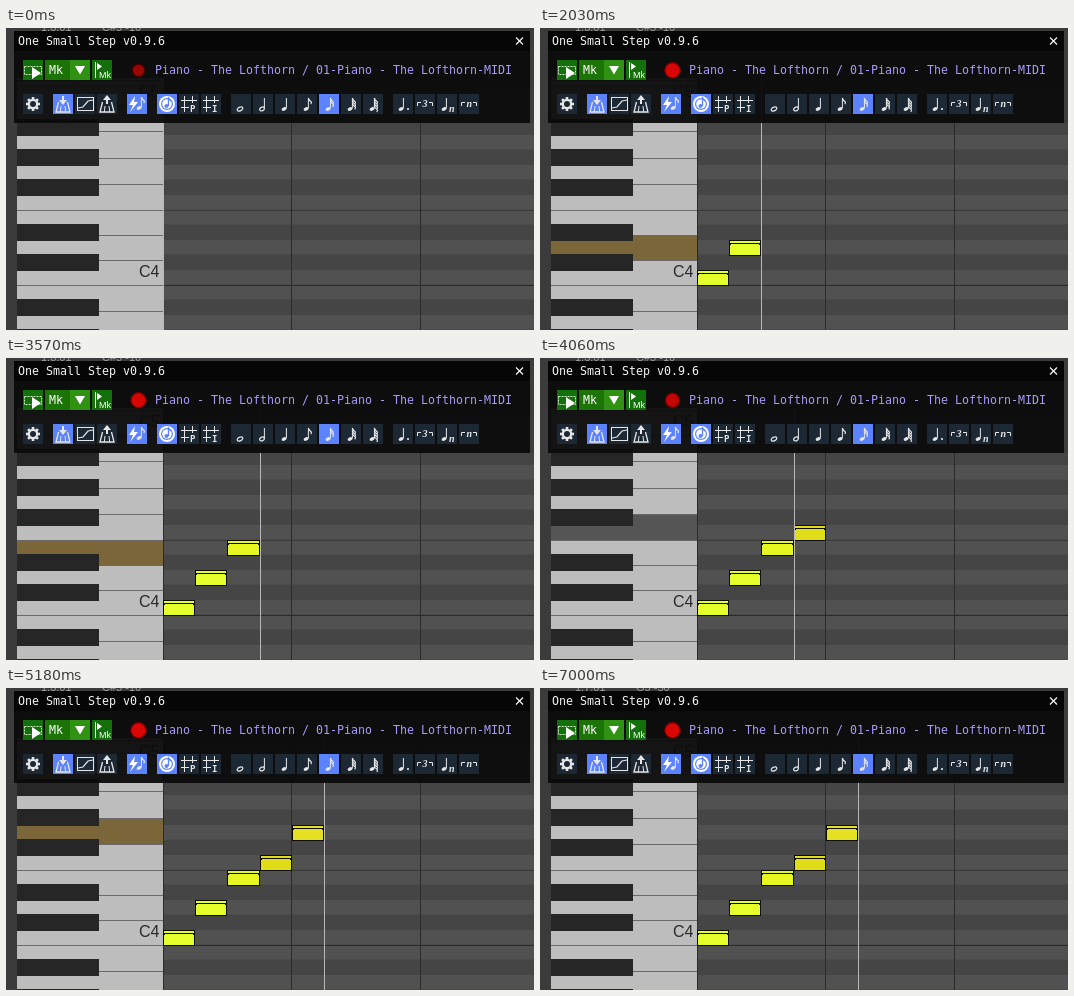
Recreate the animation shown at these times as an HTML page with a canvas. Size 528x302 px, loop 7070 ms.

```html
<!DOCTYPE html>
<html lang="en">
<head>
<meta charset="utf-8">
<title>Step input</title>
<style>
html, body { margin: 0; width: 528px; height: 302px; overflow: hidden; background: #3b3b3b; }
canvas { display: block; }
</style>
</head>
<body>
<canvas id="stage" width="528" height="302"></canvas>
<script>
const ctx = document.getElementById('stage').getContext('2d');
const W = 528, H = 302, LOOP = 7070, STEP = 70;
const MONO = '"DejaVu Sans Mono", monospace';
const SANS = '"Liberation Sans", Arial, sans-serif';
const SERIF = '"Liberation Serif", serif';
const ROW = 15, C4 = 242, ROLL_X = 157, BEAT = 128.8, ROLL_TOP = 50;
const BLACK = [1, 3, 6, 8, 10];
const WHITE = '#e6e6e6', BLUE = '#5b82ff', DARK = '#1c2834';

// semitone above C4, its white key, press and release times, colour
const NOTES = [
  { semi: 0, white: 0, on: 1050, off: 1540, fill: '#e4ff2c' },
  { semi: 2, white: 1, on: 1750, off: 2380, fill: '#e4ff2c' },
  { semi: 4, white: 2, on: 3290, off: 3780, fill: '#e6f622' },
  { semi: 5, white: 3, on: 4060, off: 4480, fill: '#e0dc18' },
  { semi: 7, white: 4, on: 4760, off: 5460, fill: '#e6e022' }
];

function rect(x, y, w, h, c) {
  ctx.fillStyle = c;
  ctx.fillRect(x, y, w, h);
}

function text(s, x, y, font, c) {
  ctx.font = font;
  ctx.fillStyle = c;
  ctx.fillText(s, x, y);
}

function poly(points, c) {
  ctx.beginPath();
  points.forEach(([x, y]) => ctx.lineTo(x, y));
  ctx.fillStyle = c;
  ctx.fill();
}

function line(points, c = WHITE, w = 1) {
  ctx.beginPath();
  points.forEach(([x, y], i) => i ? ctx.lineTo(x, y) : ctx.moveTo(x, y));
  ctx.strokeStyle = c;
  ctx.lineWidth = w;
  ctx.stroke();
}

function disc(x, y, r, c) {
  ctx.beginPath();
  ctx.arc(x, y, r, 0, Math.PI * 2);
  ctx.fillStyle = c;
  ctx.fill();
}

const rowY = semi => C4 - semi * ROW;
const isBlack = semi => BLACK.includes((semi + 12) % 12);

// top and bottom of the white key n steps above C4
function keySpan(n) {
  const octave = Math.floor(n / 7), k = n - octave * 7;
  const edge = i => i <= 3 ? i * 25 : 75 + (i - 3) * 26.25;
  const base = C4 + ROW - octave * 180;
  return [Math.round(base - edge(k + 1)), Math.round(base - edge(k))];
}

function drawRoll() {
  for (let s = -4; s <= 12; s++) {
    rect(ROLL_X, rowY(s), W - ROLL_X, ROW, isBlack(s) ? '#454545' : '#515151');
    if (!isBlack(s)) rect(ROLL_X, rowY(s) + ROW - 1, W - ROLL_X, 1, '#4b4b4b');
  }
  rect(ROLL_X, 182, W - ROLL_X, 1, '#3a3a3a');
  rect(ROLL_X, 257, W - ROLL_X, 1, '#2a2a2a');
  for (let i = 0; i < 3; i++) rect(Math.floor(ROLL_X + i * BEAT), ROLL_TOP, 1, H, '#2b2b2b');
}

function drawKeys(t) {
  rect(11, ROLL_TOP, 146, H - ROLL_TOP, '#bdbdbd');
  for (const n of NOTES) {
    if (t < n.on || t >= n.off) continue;
    const [top, bottom] = keySpan(n.white);
    rect(11, top, 146, bottom - top, t < n.on + 280 ? '#555555' : '#7b663a');
  }
  for (let n = -2; n < 8; n++) rect(11, keySpan(n)[0], 146, 1, '#6a6a6a');
  for (let s = -4; s <= 12; s++) {
    if (isBlack(s)) rect(11, rowY(s) - 1, 82, ROW + 2, '#262626');
  }
  text('C4', 133, 249, '16px ' + SANS, '#2a2a2a');
  text('C5', 133, 69, '16px ' + SANS, '#2a2a2a');
}

function drawNotes(t) {
  let cursor = ROLL_X;
  NOTES.forEach((n, i) => {
    if (t < n.on) return;
    const x = Math.round(ROLL_X + i * BEAT / 4);
    const end = Math.round(ROLL_X + (i + 1) * BEAT / 4);
    const y = rowY(n.semi);
    rect(x, y, end - x, ROW + 1, '#0c0c00');
    rect(x + 1, y + 1, end - x - 2, 2, n.fill);
    rect(x + 1, y + 4, end - x - 2, ROW - 4, n.fill);
    rect(x + 1, y + 4, 1, 1, '#0c0c00');
    rect(end - 2, y + 4, 1, 1, '#0c0c00');
    if (t >= n.on + STEP) cursor = end;
  });
  rect(cursor, ROLL_TOP, 1, H, '#b8b8b8');
}

function button(x, y, c, w = 20) {
  rect(x, y, w, 20, c);
}

function gear(x, y) {
  for (let i = 0; i < 8; i++) {
    const a = i * Math.PI / 4;
    line([[x, y], [x + 7 * Math.cos(a), y + 7 * Math.sin(a)]], WHITE, 2.6);
  }
  disc(x, y, 5.3, WHITE);
  disc(x, y, 3, DARK);
}

function keysIcon(x, up) {
  const y = 67;
  line([[x + 10, y + 1], [x + 10, y + 9]], WHITE, 2);
  const tip = up ? y : y + 10, base = up ? y + 5 : y + 5;
  poly([[x + 6, base], [x + 14, base], [x + 10, tip]], WHITE);
  line([[x + 5.5, y + 7], [x + 3, y + 17], [x + 17, y + 17], [x + 14.5, y + 7]], WHITE, 1.3);
  line([[x + 8, y + 11], [x + 7.3, y + 17]]);
  line([[x + 12, y + 11], [x + 12.7, y + 17]]);
}

function grid(x, letter) {
  line([[x + 5.5, 68], [x + 5.5, 84]]);
  line([[x + 13.5, 68], [x + 13.5, 75]]);
  line([[x + 2, 72.5], [x + 18, 72.5]]);
  line([[x + 2, 79.5], [x + 10, 79.5]]);
  text(letter, x + 11, 84, 'bold 9px ' + MONO, WHITE);
}

// kind 0 whole, 1 half, 2 quarter, then one flag more for each
function noteIcon(x, y, kind) {
  ctx.beginPath();
  ctx.ellipse(x, y, kind ? 2.5 : 3, 1.8, -0.45, 0, Math.PI * 2);
  ctx.fillStyle = ctx.strokeStyle = WHITE;
  ctx.lineWidth = 1.2;
  if (kind < 2) ctx.stroke(); else ctx.fill();
  if (!kind) return;
  line([[x + 2.4, y - 0.5], [x + 2.4, y - 11]]);
  for (let i = 0; i < kind - 2; i++) {
    const f = y - 11 + i * 2.6;
    ctx.beginPath();
    ctx.moveTo(x + 2.4, f);
    ctx.quadraticCurveTo(x + 3, f + 2.5, x + 5, f + 3.5);
    ctx.quadraticCurveTo(x + 6, f + 4.6, x + 4.8, f + 6.2);
    ctx.lineWidth = 1.2;
    ctx.stroke();
  }
}

function tuplet(x, s) {
  line([[x + 2.5, 78], [x + 2.5, 74.5], [x + 6, 74.5]]);
  line([[x + 14, 74.5], [x + 17.5, 74.5], [x + 17.5, 78]]);
  text(s, x + 7.5, 79, 'italic bold 10px ' + SERIF, WHITE);
}

function drawTopRow(t) {
  button(17, 32, '#14700a');
  ctx.setLineDash([2, 1]);
  ctx.strokeStyle = '#c8e8c0';
  ctx.lineWidth = 1;
  ctx.strokeRect(18.5, 38.5, 17, 8);
  ctx.setLineDash([]);
  poly([[26, 39], [35, 45], [26, 51]], '#ffffff');

  button(39, 32, '#1c7406', 25);
  button(64, 32, '#309212');
  text('Mk', 43, 46, '11.63px ' + MONO, '#ffffff');
  poly([[69, 38], [79, 38], [74, 46.5]], '#ffffff');

  button(86, 32, '#14700a');
  line([[89.5, 34], [89.5, 50]], '#ffffff');
  poly([[91, 35], [96, 38.5], [91, 42]], '#ffffff');
  text('Mk', 93, 50, '9px ' + SANS, '#ffffff');

  const pulse = Math.cos(4 * t / 1000 - 2.4);
  disc(132.5, 42.3, 7.6 + 0.8 * pulse, `rgb(${Math.round(95 + 40 * pulse)},0,0)`);
  disc(132.5, 42.3, 6.2 + 0.8 * pulse, `rgb(${Math.round(182 + 40 * pulse)},6,4)`);
  text('Piano - The Lofthorn / 01-Piano - The Lofthorn-MIDI', 149, 46, '11.63px ' + MONO, '#a49cf8');
}

function drawToolRow() {
  const lit = [47, 121, 151, 313];
  const group = (x, n) => {
    for (let i = 0; i < n; i++) button(x + 22 * i, 66, lit.includes(x + 22 * i) ? BLUE : DARK);
  };
  group(17, 1);
  group(47, 3);
  group(121, 1);
  group(151, 3);
  group(225, 7);
  group(387, 4);

  gear(27, 76);
  keysIcon(47, false);
  ctx.strokeStyle = WHITE;
  ctx.lineWidth = 1;
  ctx.strokeRect(71.5, 69.5, 16, 13);
  line([[72, 80], [77, 79], [82, 73], [87, 72]], WHITE, 1.2);
  keysIcon(91, true);

  poly([[129, 68], [123, 77], [127, 77], [124, 84], [132, 74], [128, 74]], '#ffffff');
  noteIcon(133, 80, 3);

  disc(161, 76, 8, '#ffffff');
  disc(161, 76, 6, BLUE);
  disc(161, 76, 4.8, '#ffffff');
  line([[162.5, 78], [162.5, 70], [165, 73]], BLUE, 1.3);
  disc(160.5, 78, 2, BLUE);

  grid(173, 'P');
  grid(195, 'I');

  for (let i = 0; i < 7; i++) noteIcon(234 + 22 * i, 81, i);
  noteIcon(395, 81, 2);
  disc(402, 81, 1.1, WHITE);
  tuplet(409, '3');
  noteIcon(438, 81, 2);
  text('n', 443, 84, 'italic bold 10px ' + SERIF, WHITE);
  tuplet(453, 'n');
}

function drawWindow(t) {
  rect(8, 3, 516, 92, 'rgba(11,11,11,0.95)');
  rect(8, 3, 516, 20, '#060606');
  text('One Small Step v0.9.6', 12, 17, '11.63px ' + MONO, '#f4f4f4');
  line([[510, 9.5], [517, 16.5]], '#f4f4f4', 1.2);
  line([[517, 9.5], [510, 16.5]], '#f4f4f4', 1.2);
  drawTopRow(t);
  drawToolRow();
}

function draw(t) {
  rect(0, 0, W, H, '#3b3b3b');
  const moved = t >= 6440;
  text(moved ? '1.7.01' : '1.3.01', 35, 3, '11px ' + SANS, '#a0a0a0');
  text(moved ? 'G5 -50' : 'C#5 -10', 96, 3, '11px ' + SANS, '#a0a0a0');
  ctx.save();
  ctx.beginPath();
  ctx.rect(0, ROLL_TOP, W, H);
  ctx.clip();
  drawRoll();
  drawKeys(t);
  drawNotes(t);
  ctx.restore();
  rect(524, 3, 4, 92, '#3e3e3e');
  drawWindow(t);
}

const start = performance.now();
function tick() {
  const t = (performance.now() - start) % LOOP;
  draw(Math.floor(t / STEP) * STEP);
  requestAnimationFrame(tick);
}
tick();
</script>
</body>
</html>
```
